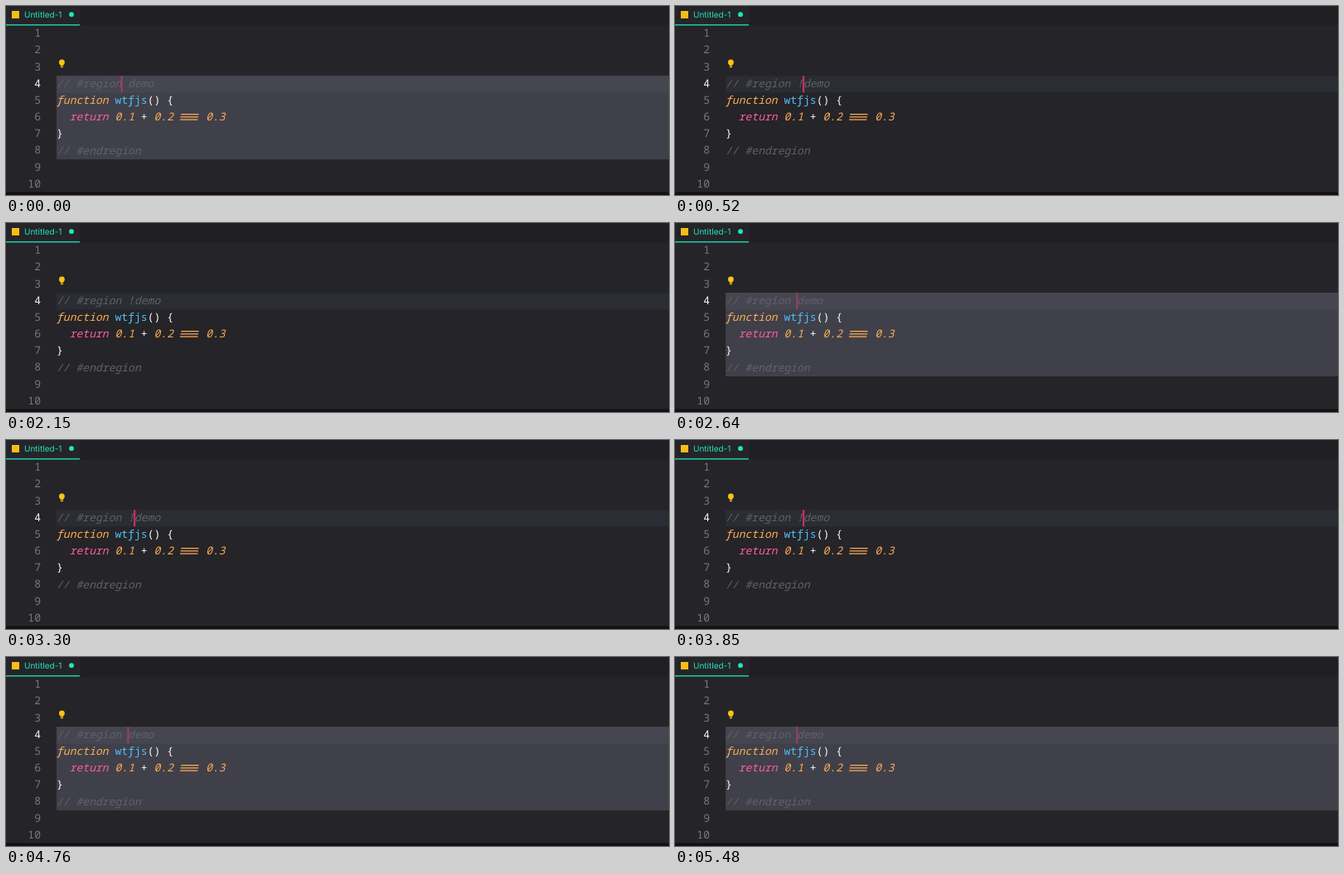
Recreate the animation shown at these times as an HTML page. Size 800 by 228 pixels, loop 5.51 s.

```html
<!DOCTYPE html>
<html lang="en">
<head>
<meta charset="utf-8">
<title>Editor</title>
<style>
  html, body { margin: 0; width: 100%; height: 100%; overflow: hidden; background: #252428; }
  svg { display: block; width: 800px; height: 228px; }
  text { white-space: pre; text-rendering: geometricPrecision; }
  .code, .num { font: 13.05px "Noto Sans Mono", "DejaVu Sans Mono", monospace; }
  .code { font-weight: 500; fill: #fafafa; }
  .num { fill: #78777b; text-anchor: end; }
  .num.on { fill: #f4f4f5; }
  .tab { font: 10px Inter, Roboto, sans-serif; fill: #1ee6c0; }
  .it { font-style: italic; }
  .note { font-style: italic; font-weight: 400; fill: #60616a; }
  .val { font-style: italic; fill: #fdac54; }
  .key { font-style: italic; fill: #fa5ea0; }
  .fn { fill: #4fbdf5; }
  .tail { fill: none; stroke-width: 1.3; stroke-linecap: round; }

  .plain, .picked, #caret { animation: 5510ms step-end infinite; }
  .plain { animation-name: plain; }
  .picked { animation-name: picked; }
  #caret { animation-name: move, blink; }

  /* typed at 440 and 2840 ms, erased at 2200 and 4460 ms */
  @keyframes plain {
    0%, 39.93%, 80.94%, 100% { opacity: 0; }
    7.99%, 51.54% { opacity: 1; }
  }
  @keyframes picked {
    0%, 39.93%, 80.94%, 100% { opacity: 1; }
    7.99%, 51.54% { opacity: 0; }
  }
  @keyframes move {
    0% { transform: translateX(138.6px); fill: #b8376a; }
    3.63%, 39.93%, 80.94%, 100% { transform: translateX(146.4px); fill: #a83c68; }
    7.99%, 51.54% { transform: translateX(154.2px); fill: #ee2b72; }
  }
  /* half a second on, half a second off, restarted by every key */
  @keyframes blink {
    0%, 26.13%, 39.93%, 51.54%, 69.69%, 80.94%, 99.09%, 100% { opacity: 1; }
    17.06%, 35.21%, 49%, 60.62%, 78.77%, 90.02% { opacity: 0; }
  }
</style>
</head>
<body>
<svg viewBox="0 0 800 228">
  <rect width="800" height="228" fill="#252428"/>
  <rect x="89" width="711" height="23.5" fill="#201f23"/>
  <rect y="22.2" width="89" height="1.3" fill="#1ee6c0"/>
  <rect x="7" y="6" width="9" height="9" fill="#f5bd18"/>
  <text class="tab" x="22" y="13.6">Untitled-1</text>
  <circle cx="79" cy="10.2" r="2.9" fill="#1ee6c0"/>
  <rect y="224.5" width="800" height="3.5" fill="#170f14"/>

  <rect class="plain" x="61" y="84.2" width="739" height="20.2" fill="#2a2d33"/>
  <g class="picked">
    <rect x="61" y="84.2" width="739" height="100.8" fill="#40404a"/>
    <rect x="61" y="84.2" width="739" height="20.2" fill="#454650"/>
  </g>

  <g id="numbers"></g>

  <g fill="#fdc114">
    <circle cx="67.4" cy="68" r="3.4"/>
    <rect x="65.7" y="70" width="3.4" height="2.4"/>
    <rect x="65.9" y="73" width="3" height="1.2"/>
  </g>

  <g class="code">
    <text class="note picked" x="61" y="98">// #region demo</text>
    <text class="note plain" x="61" y="98">// #region !demo</text>
    <text x="61" y="118.1"><tspan class="val">function</tspan> <tspan class="fn">wtfjs</tspan>() {</text>
    <text x="61" y="138.3">  <tspan class="key">return</tspan> <tspan class="val">0.1</tspan> + <tspan class="val">0.2</tspan> <tspan fill="none">===</tspan> <tspan class="val">0.3</tspan></text>
    <text x="61" y="158.4">}</text>
    <text class="note" x="61" y="178.6">// #endregion</text>
  </g>
  <path class="tail" stroke="#fdac54" d="M64.6 117.5Q64 121.2 62 120.8"/>
  <path class="tail" stroke="#4fbdf5" d="M151 117.5Q151 121.2 148.4 120.8"/>
  <path stroke="#fdac54" stroke-width="1.3" d="M211.2 130.7H232.6M210.6 133.9H232M210 137.1H231.4"/>

  <rect id="caret" y="84.2" width="1.8" height="20.2"/>
</svg>
<script>
  const numbers = document.getElementById("numbers");
  for (let n = 1; n <= 10; n++) {
    const label = document.createElementNS("http://www.w3.org/2000/svg", "text");
    label.setAttribute("class", n === 4 ? "num on" : "num");
    label.setAttribute("x", 42);
    label.setAttribute("y", 37.3 + 20.16 * (n - 1));
    label.textContent = n;
    numbers.append(label);
  }
</script>
</body>
</html>
```
